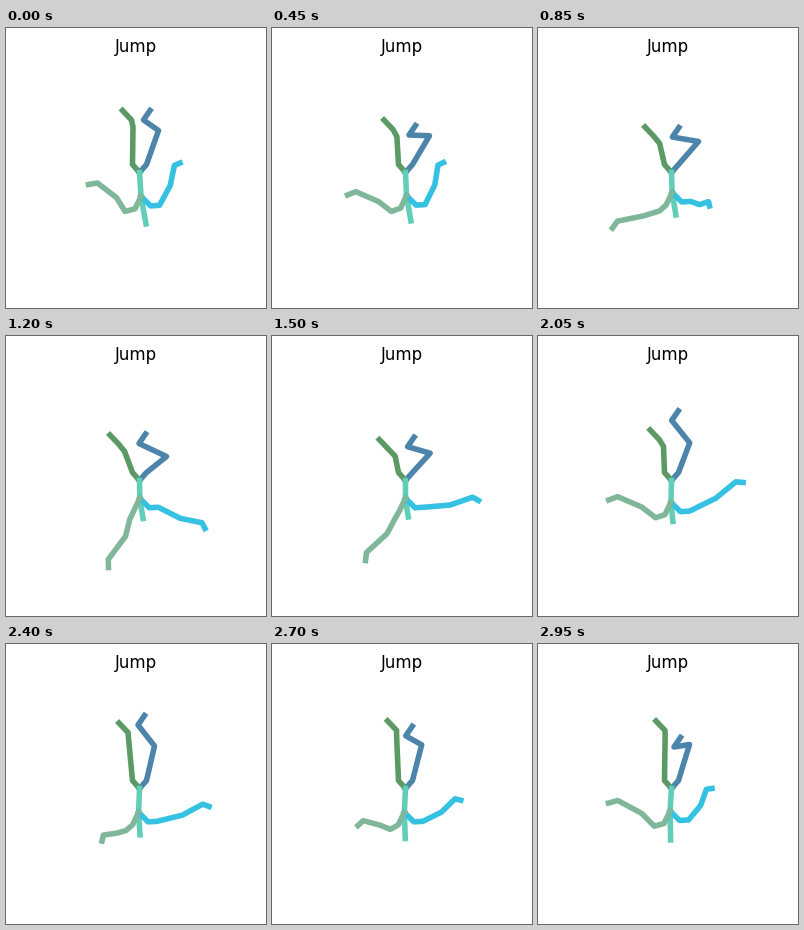
A matplotlib script that plays this animation: 260 by 280 pixels, repeating every 3000 ms.

```python
import numpy as np
import matplotlib.pyplot as plt
from matplotlib.animation import FuncAnimation

W, H, DPI = 260, 280, 100
FRAMES, STEP = 60, 50

ROOT, HIP_R, HIP_L = np.array([(133, 144), (140, 136), (126, 136)])


def path(*points):
    """Smooth curve through waypoints (ms, x, y)."""
    points = np.array(points, float)
    times, spots = points[:, 0], points[:, 1:]
    slopes = np.gradient(spots, times, axis=0)

    def at(t):
        i = min(np.searchsorted(times, t, "right"), len(times) - 1) - 1
        d = times[i + 1] - times[i]
        u = (t - times[i]) / d
        v = 1 - u
        return (v * v * ((1 + 2 * u) * spots[i] + u * d * slopes[i])
                + u * u * ((1 + 2 * v) * spots[i + 1] - v * d * slopes[i + 1]))

    return at


foot_r = path((0, 143.5, 82), (450, 143, 97), (1200, 139, 97.5), (1750, 143, 98),
              (2180, 138.5, 68), (2400, 138, 71), (2950, 142, 93))
knee_r = path((0, 152, 102), (850, 160, 113), (1200, 160, 120), (1750, 155, 111.5),
              (2400, 148, 101.5), (2950, 151, 100))
foot_l = path((0, 116, 82), (450, 111.5, 91.5), (850, 106.5, 98.5), (1200, 103.5, 98.5),
              (1750, 110.5, 104.5), (2400, 112.5, 78.5), (2950, 117.5, 76.5))
hand_r = path((0, 173.5, 134.5), (450, 171, 134), (850, 171, 177.5), (1200, 198.5, 192),
              (1500, 206, 164), (1750, 200, 142), (2200, 206, 153), (2400, 202.5, 162),
              (2950, 173.5, 144))
hand_l = path((0, 82, 156), (450, 75, 166.5), (850, 74, 199.5), (1200, 102, 231),
              (1500, 93, 224), (1750, 98.5, 207), (2000, 71, 165), (2400, 95.5, 196.5),
              (2950, 70, 158.5))


def wave(t, period, delay=0):
    return np.cos(2 * np.pi * (t - delay) / period)


def bend(start, end, along, bow):
    """Point part of the way along a line, pushed sideways by bow pixels."""
    x, y = end - start
    return start + along * (end - start) + bow * np.array([-y, x]) / np.hypot(x, y)


def right_leg(t):
    foot = foot_r(t)
    return [ROOT, HIP_R, knee_r(t), foot + (-6.5, 9.5), foot]


def left_leg(t):
    foot = foot_l(t)
    knee = foot + (9 + 0.25 * (foot[1] - 76), 16.5)
    return [ROOT, HIP_L, knee, foot + (9, 9.5), foot]


def spine(t):
    chest = np.array([134.5 - t / 1000, 164.8 + 3.3 * wave(t, 2400, 150)])
    head = np.array([139.5 - t / 400, 188 + 7.5 * wave(t, 3000)])
    return [ROOT, (ROOT + chest) / 2, chest, chest + 0.72 * (head - chest), head]


def right_arm(t, chest):
    hand, shoulder = hand_r(t), chest + (18.5, 9)
    elbow = bend(shoulder, hand, 0.48, 1)
    wrist = bend(shoulder, hand, 0.9, -4)
    return [chest, chest + (9.5, 9.5), shoulder, elbow, wrist, hand]


def left_arm(t, chest):
    hand = hand_l(t)
    drop = (hand[1] - 156) / 75  # 0 raised, 1 hanging
    shoulder = chest + (-16 + 6 * drop, 15 + 6 * drop)
    elbow = bend(shoulder, hand, 0.33, 6 - 9 * drop)
    wrist = bend(shoulder, hand, 0.86, 6.5 - 3 * drop)
    return [chest, chest + (-6, 12.5), shoulder, elbow, wrist, hand]


def skeleton(t):
    back = spine(t)
    chest = back[2]
    return right_leg(t), left_leg(t), back, right_arm(t, chest), left_arm(t, chest)


fig = plt.figure(figsize=(W / DPI, H / DPI), dpi=DPI, facecolor="white")
fig.text(0.5, 1 - 24 / H, "Jump", family="DejaVu Sans", size=12, ha="center", va="baseline")
ax = fig.add_axes([0, 0, 1, 1])
ax.set_xlim(-0.5, W - 0.5)  # whole numbers fall on pixel centres
ax.set_ylim(H - 0.5, -0.5)
ax.axis("off")

COLORS = ["#4D84AA", "#5B9965", "#61CEB9", "#34C1E2", "#80B79A"]
lines = [ax.plot([], [], color=c, lw=4, solid_capstyle="projecting")[0] for c in COLORS]


def draw(i):
    for line, joints in zip(lines, skeleton(i * STEP)):
        line.set_data(*np.transpose(joints))
    return lines


anim = FuncAnimation(fig, draw, frames=FRAMES, interval=STEP, repeat=True, repeat_delay=0)
plt.show()
```
